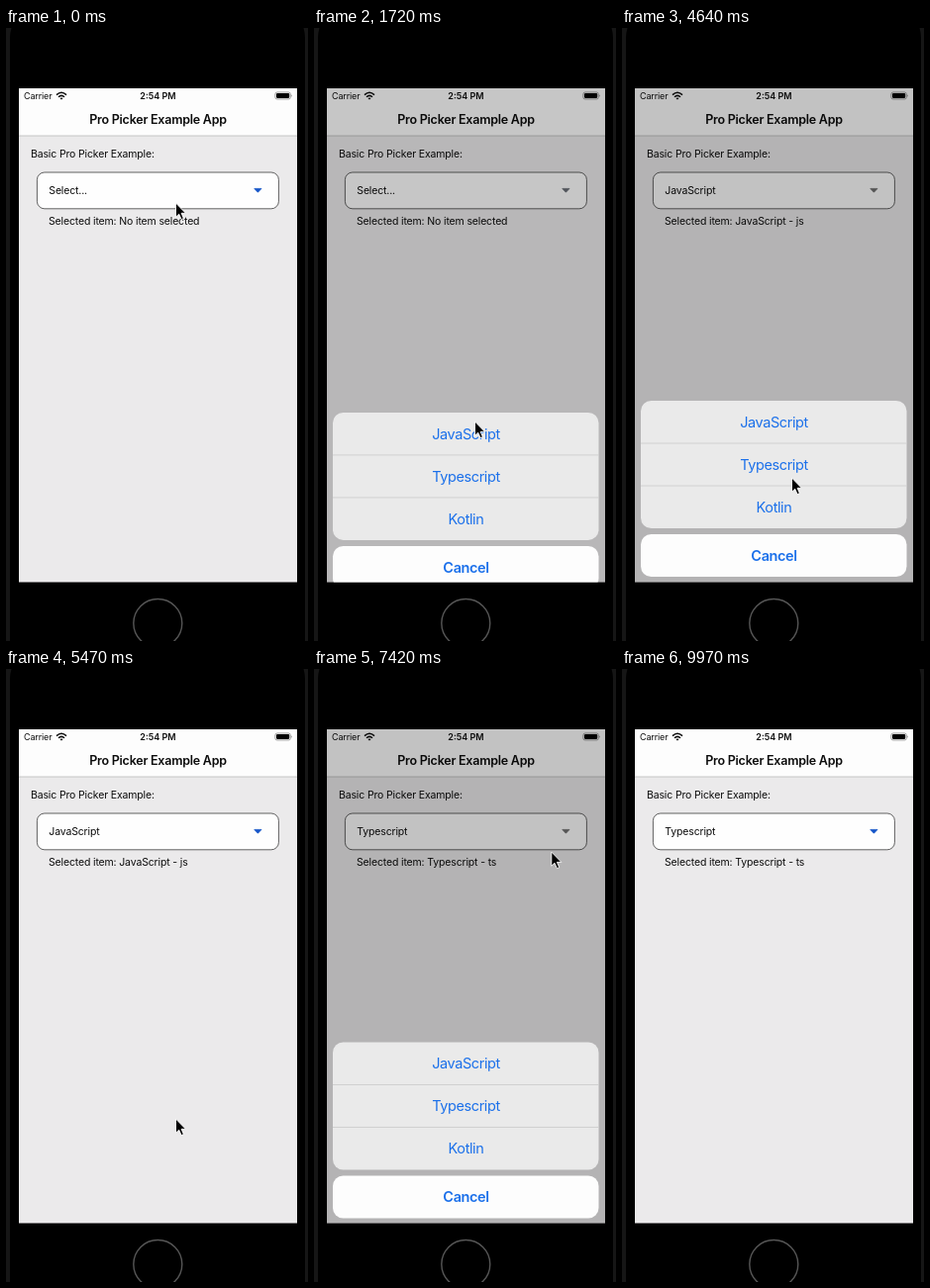
Animation, 305 px wide and 620 px high, one loop 10 s. Source, as an HTML page:

```html
<!DOCTYPE html>
<html lang="en">
<head>
<meta charset="utf-8">
<title>Picker demo</title>
<style>
  html, body { margin: 0; width: 100%; height: 100%; overflow: hidden; background: #161616; }
  svg { display: block; width: 305px; height: 620px; }
  text { font: 10.5px Inter, "Liberation Sans", sans-serif; letter-spacing: -.15px; fill: #0c0c0c; }
  .mid { text-anchor: middle; }
  .status { font-size: 9px; }
  .clock { font-size: 9px; font-weight: 600; letter-spacing: 0; }
  .title { font-size: 12.5px; font-weight: 600; letter-spacing: -.24px; }
  .row { font-size: 14.5px; letter-spacing: -.4px; fill: #1b70ea; }
  .bold { font-weight: 600; }
</style>
</head>
<body>
<svg viewBox="0 0 305 620">
  <clipPath id="screen"><rect x="13" y="61" width="281" height="499.5"/></clipPath>
  <rect width="305" height="620" fill="#161616"/>
  <rect x="4" y="-24" width="298" height="700" rx="34"/>
  <circle cx="153.3" cy="602" r="24.5" fill="none" stroke="#565656" stroke-width="1.4"/>

  <g clip-path="url(#screen)">
    <rect x="13" y="61" width="281" height="500" fill="#ebeaeb"/>
    <rect x="13" y="61" width="281" height="48" fill="#fdfdfd"/>
    <path d="M13 109H294" stroke="#b8b8b8" stroke-width=".8"/>

    <text class="status" x="18" y="72">Carrier</text>
    <g fill="none" stroke="#0c0c0c" stroke-width="1.5">
      <path d="M51 67.6Q56 63 61 67.6M53 69.8Q56 67 59 69.8"/>
      <path d="M54.4 71L56 72.6L57.6 71Q56 70 54.4 71Z" fill="#0c0c0c" stroke="none"/>
    </g>
    <text class="clock mid" x="153.5" y="72">2:54 PM</text>
    <rect x="271.9" y="65" width="15.4" height="7" rx="2" fill="none" stroke="#777" stroke-width=".7"/>
    <rect x="273" y="66.1" width="13.2" height="4.8" rx="1.1"/>
    <path d="M288.2 67.3q1.4 1.2 0 2.4z" fill="#777"/>
    <text class="title mid" x="153.5" y="96.6">Pro Picker Example App</text>

    <text x="25" y="131">Basic Pro Picker Example:</text>
    <g id="picker">
      <rect x="31.4" y="146" width="244" height="36.8" rx="7.5" fill="#fefefe" stroke="#3c3c3c" stroke-width=".8"/>
      <text id="value" x="43.3" y="167.8"></text>
      <path id="arrow" d="M250.8 162.4H258L254.4 166.2Z" stroke-width=".8" stroke-linejoin="round"/>
    </g>
    <text id="result" x="43" y="199.2"></text>

    <rect id="dim" x="13" y="61" width="281" height="500"/>
    <g id="sheet">
      <rect x="19" y="377" width="268.5" height="129" rx="10.5" fill="#eaeaea"/>
      <path d="M19 420H287.5M19 463H287.5" stroke="#c9c9ca" stroke-width=".8"/>
      <text class="row mid" x="153.5" y="404">JavaScript</text>
      <text class="row mid" x="153.5" y="447">Typescript</text>
      <text class="row mid" x="153.5" y="490">Kotlin</text>
      <rect x="19" y="512" width="268.5" height="43" rx="10.5" fill="#fdfdfd"/>
      <text class="row bold mid" x="153.5" y="538.8">Cancel</text>
    </g>
  </g>
  <path id="cursor" d="M0 0V14.2L3.2 11.2L5.6 16.6L7.9 15.6L5.6 10.3H10Z" stroke="#fff" stroke-width=".9" stroke-linejoin="round"/>
</svg>
<script>
const LOOP = 10000, TRAVEL = 190;
const $ = id => document.getElementById(id);
const clamp = v => Math.min(1, Math.max(0, v));
const span = (t, from, length) => clamp((t - from) / length);
const smooth = p => p * p * (3 - 2 * p);
const easeOut = p => 1 - (1 - p) ** 3;
const mix = (a, b, p) => a + (b - a) * p;

// One entry per use of the picker, in ms.
const uses = [
  { press: 100, open: 330, close: 1660 },
  { press: 3680, open: 3860, close: 5060 },
  { press: 6830, open: 7050, close: 8150 }
];

const values = [
  [0, 'Select...', 'No item selected'],
  [2110, 'JavaScript', 'JavaScript - js'],
  [5610, 'Typescript', 'Typescript - ts']
];

// Pointer moves: start, end, bend x/y, destination x/y.
const home = [171.5, 177];
const moves = [
  [750, 1420, 176, 290, 162.5, 398],
  [2920, 3310, 172, 275, 257.5, 148.5],
  [4080, 4600, 236, 310, 171.5, 455],
  [5720, 6600, 196, 320, 241.5, 169.5],
  [7330, 8010, 225, 330, 176, 435],
  [8920, 9400, 80, 490, 33, 460],
  [9400, 9900, 36, 200, -12, 20]
];

function pointer(t) {
  let [x, y] = home;
  for (const [start, end, bx, by, tx, ty] of moves) {
    if (t < start) break;
    const p = smooth(span(t, start, end - start));
    x = mix(mix(x, bx, p), mix(bx, tx, p), p);
    y = mix(mix(y, by, p), mix(by, ty, p), p);
  }
  return [x, y];
}

function draw(t) {
  let shown = 0, pressed = 0;
  for (const { press, open, close } of uses) {
    shown += easeOut(span(t, open, 430)) - smooth(span(t, close, 400));
    pressed += smooth(span(t, press, 150)) - smooth(span(t, open, 250));
  }
  const [, value, result] = values.findLast(v => t >= v[0]);
  $('value').textContent = value;
  $('result').textContent = 'Selected item: ' + result;
  $('picker').setAttribute('opacity', 1 - .8 * pressed);

  const blue = [[21, 110], [85, 110], [200, 110]].map(([a, b]) => Math.round(mix(a, b, shown)));
  $('arrow').setAttribute('fill', `rgb(${blue})`);
  $('arrow').setAttribute('stroke', `rgb(${blue})`);
  $('dim').setAttribute('opacity', .235 * shown);
  $('sheet').setAttribute('transform', `translate(0 ${TRAVEL * (1 - shown)})`);

  $('cursor').setAttribute('transform', `translate(${pointer(t)})`);
  $('cursor').setAttribute('opacity', t < 9900 ? 1 : 0);
}

const begin = performance.now();
function tick() {
  draw((performance.now() - begin) % LOOP);
  requestAnimationFrame(tick);
}
tick();
</script>
</body>
</html>
```
